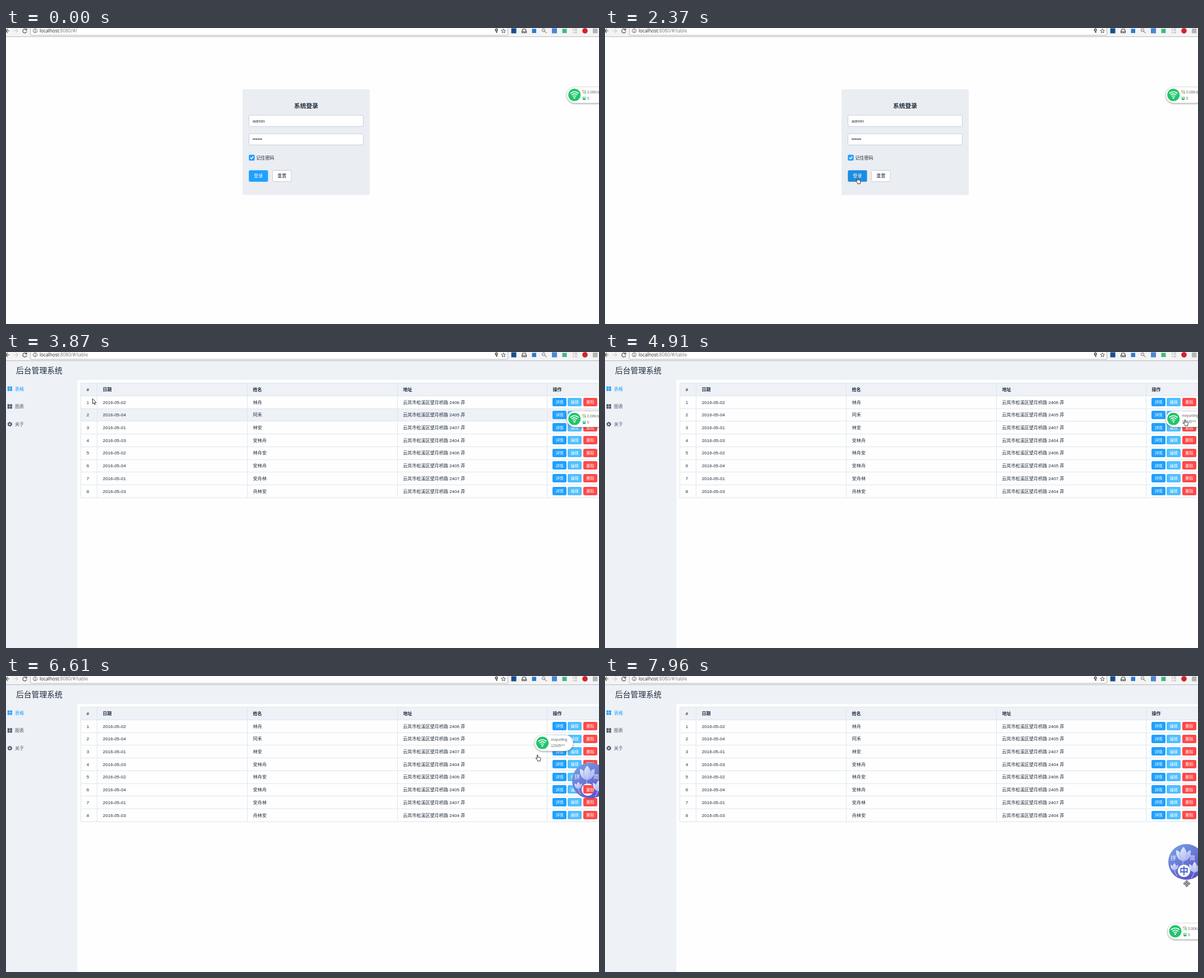
An HTML page that plays this animation: 1058 by 529 pixels, repeating every 8000 ms.

```html
<!DOCTYPE html>
<html lang="zh-CN">
<head>
<meta charset="utf-8">
<title>后台管理系统</title>
<style>
  html, body { margin: 0; width: 100%; height: 100%; overflow: hidden; background: #fefefe; }
  svg { display: block; width: 100%; height: 100%; }
  text { font: 8.05px "Liberation Sans", "Noto Sans CJK SC", "Noto Sans CJK", sans-serif; fill: #1f2d3d; white-space: pre; }
  .url { font: 8.25px "Open Sans", "Noto Sans", sans-serif; fill: #777; }
  .line { fill: none; stroke: #444; stroke-width: 1.1; }
  .white { fill: none; stroke: #fff; stroke-width: 1.6; }
  #widget .pill { filter: drop-shadow(0 1.5px 1.5px rgba(0, 0, 0, .4)); }
  #widget text { fill: #666; }
</style>
</head>
<body>
<svg id="stage" viewBox="0 0 1058 529" preserveAspectRatio="none"></svg>
<script>
const LOOP = 8000, STEP = 136, LAG = 130;
const LOGIN_END = 2520;
const ROWS = 8, ROW_TOP = 78, ROW_H = 22.7;
const $ = id => document.getElementById(id);

const rect = (x, y, w, h, fill, extra = '') =>
  `<rect x="${x}" y="${y}" width="${w}" height="${h}" fill="${fill}" ${extra}/>`;
const circle = (x, y, r, fill, extra = '') =>
  `<circle cx="${x}" cy="${y}" r="${r}" fill="${fill}" ${extra}/>`;
const path = (d, extra = 'class="line"') => `<path d="${d}" ${extra}/>`;
const group = (id, content) => `<g id="${id}">${content}</g>`;
const middle = 'text-anchor="middle"';
// cy is the middle of the line of text
const label = (x, cy, str, style = '', size = 8.05, extra = '') =>
  `<text x="${x}" y="${Math.round(cy + size * .37)}" style="font-size:${size}px;${style}" ${extra}>${str}</text>`;

function toolbar() {
  const list = [2, 5, 8.5].map(y => `M1011 ${y}H1013M1014.5 ${y}H1019`).join('');
  return rect(0, 0, 1058, 15, '#f4f4f4') + rect(0, 15, 1058, 1, '#b9b9b9') +
    rect(43.5, -6, 852, 19, '#fff', 'rx="1.5" stroke="#b5b5b5"') +
    path('M6 5H0M3 1.5L-.5 5L3 8.5') +
    path('M13 5H21M17.5 1.5L21 5L17.5 8.5', 'class="line" style="stroke:#ccc"') +
    path('M36.3 3A3.6 3.6 0 1 0 37 6M37 .8V3.8H34') +
    circle(52, 5, 3.6, 'none', 'stroke="#555" stroke-width=".9"') + path('M52 4.5V7.2M52 2.6V3.6') +
    `<text class="url" x="60" y="8"><tspan fill="#222">localhost</tspan>:8080/#/<tspan id="route">table</tspan></text>` +
    circle(875, 3.4, 1.8, 'none', 'stroke="#444" stroke-width="1.5"') + path('M875 5V9M875 7.5H877') +
    path('M887.5 1.4L888.6 4L891.3 4.2L889.2 6L889.9 8.7L887.5 7.2L885.1 8.7L885.8 6L883.7 4.2L886.4 4Z',
      'class="line" style="stroke-width:.9"') +
    path('M920.5 8.5V6L922 2H927L928.5 6V8.5ZM920.5 6H923L924 7H925.5L926.5 6H928.5') +
    circle(959, 4, 2.7, '#dde', 'stroke="#888"') + path('M961 6L964.5 9', 'class="line" style="stroke:#a85"') +
    path(list, 'class="line" style="stroke:#999"') +
    rect(901.5, .5, 9, 9, '#174f8c') + rect(938.5, 1.5, 7.5, 7.5, '#2b7cd0') +
    rect(974, .5, 9, 9, '#4a86d8') + rect(992.5, 1.5, 8, 7.5, '#41b883') +
    circle(1033, 5, 4.8, '#d5202a') + rect(1047, 1, 8.5, 8.5, '#b5b5b5');
}

function login() {
  const field = y => rect(433.5, y, 204, 20, '#fff', 'rx="2.3" stroke="#c5cfdc"');
  const dots = Array.from({ length: 6 }, (_, i) => circle(441.4 + i * 2.85, 198.6, 1.15, '#1f2d3d')).join('');
  return rect(422, 109.5, 227, 189, '#eaedf2', 'rx="3"') +
    label(535.5, 139, '系统登录', 'font-weight:bold', 10.75, middle) +
    field(156) + label(440, 166, 'admin') + field(189) + dots +
    rect(433.3, 226.5, 10.4, 10.4, '#20a0ff', 'rx="2"') + path('M436 231.6L438 233.7L441.4 229.7', 'class="white"') +
    label(446.3, 231.6, '记住密码') +
    rect(433.3, 254.2, 34.2, 20.6, '#20a0ff', 'rx="2.3" id="submit"') +
    label(450.4, 264.5, '登录', 'fill:#fff;font-weight:500', 8.05, middle) +
    rect(475.5, 254.5, 33.6, 20, '#fff', 'rx="2.3" stroke="#c9ccd2"') +
    label(492.3, 264.5, '重置', 'font-weight:500', 8.05, middle);
}

function sidebar() {
  const items = ['表格', '图表', '关于'].map((name, i) => {
    const y = 65.6 + i * 31.7, color = i ? '#48576a' : '#20a0ff';
    const ring = (r, w, dash) => circle(6.8, y, r, 'none', `stroke="${color}" stroke-width="${w}" stroke-dasharray="${dash}"`);
    const icon = i < 2
      ? rect(2.7, y - 4, 3.7, 8, color) + rect(7.2, y - 4, 3.7, 8, color) + rect(2.7, y - .3, 8.2, .5, '#eef1f6')
      : ring(2.6, 2, 'none') + ring(3.8, 1, '2 2');
    return icon + label(16, y, name, `fill:${color}`);
  });
  return rect(0, 16, 1058, 34, '#eef1f6') + rect(0, 50, 127.3, 479, '#eef1f6') +
    label(18, 33, '后台管理系统', '', 13.8) + items.join('');
}

function grid() {
  const names = ['林舟', '阿禾', '林安', '安林舟', '林舟安', '安林舟', '安舟林', '舟林安'];
  const days = ['02', '04', '01', '03'], doors = [2406, 2405, 2407, 2404];
  const actions = [['详情', '#20a0ff'], ['编辑', '#50bfff'], ['删除', '#ff4949']];
  const columns = [133, 162, 430, 698, 965];
  const crisp = 'shape-rendering="crispEdges"';

  let out = rect(133, 55, 925, 23, '#eef1f6') + rect(133, 0, 925, ROW_H, '#eef1f6', 'id="hover"');
  ['#', '日期', '姓名', '地址', '操作'].forEach((name, i) => {
    out += i ? label(columns[i] + 10.5, 66.8, name, 'font-weight:bold')
             : label(146, 66.8, name, 'font-weight:bold', 8.05, middle);
  });
  names.forEach((name, i) => {
    const y = ROW_TOP + (i + .5) * ROW_H + .3;
    out += label(146, y, i + 1, '', 8.05, middle) +
      label(172.8, y, '2016-05-' + days[i % 4]) + label(440.8, y, name) +
      label(708.3, y, `云岚市松溪区望月桥路 ${doors[i % 4]} 弄`);
    actions.forEach(([text, color], k) => {
      const x = Math.round(975 + k * 27.3);
      out += rect(x, Math.round(y - 7.8), 25, 15, color, 'rx="2.3"') +
        label(x + 12.5, y, text, 'fill:#fff;font-weight:500', 7, middle);
    });
  });
  for (let i = 0; i <= ROWS; i++) out += rect(133, Math.round(ROW_TOP + i * ROW_H), 925, 1, '#dfe6ec', crisp);
  out += rect(133, 55, 925, 1, '#dfe6ec', crisp);
  for (const x of columns) out += rect(x, 55, 1, 205, '#dfe6ec', crisp);
  return out;
}

function badge() {
  const lotus = (x, y, s) => `<g transform="translate(${x} ${y}) scale(${s})" fill="url(#petal)">` +
    path('M0 0C-9 -2 -14 -9 -13 -20Q-8 -19 -6 -15Q-4 -22 0 -26Q4 -22 6 -15Q8 -19 13 -20C14 -9 9 -2 0 0Z', '') +
    path('M0 0Q-8 -7 -6 -15M0 0Q8 -7 6 -15', 'fill="none" stroke="#8fa3ea" stroke-width=".8"') + '</g>';
  const glyph = 'fill:#f3f5ff;font-family:"Noto Serif","Noto Sans CJK SC",serif';
  // the round opening lets the page show through
  return path('M-32 0A32 32 0 1 1 32 0A32 32 0 1 1 -32 0ZM-15 16A11 11 0 1 0 7 16A11 11 0 1 0 -15 16Z',
      'fill="url(#sky)" fill-rule="evenodd"') +
    path('M-5 -3Q-7 2 -6 5M-21 14Q-20 21 -16 25M14 18Q13 24 9 29', 'fill="none" stroke="#c3cdfa"') +
    lotus(-5, -1, 1) + lotus(-21, 15, .5) + lotus(15, 19, .75) +
    label(-23, -7, '拼', glyph, 10, middle) + label(11, -7, '简', glyph, 10, middle) +
    group('mode', label(-4, 16, '中', 'fill:#4569c9;font-weight:bold', 16, middle));
}

function widget() {
  const small = (x, y, text) => label(x, y, text, '', 6.3);
  return rect(.5, .5, 68.5, 28.5, '#fff', 'rx="14.2" class="pill" stroke="#ddd" stroke-width=".6"') +
    circle(14.2, 14.6, 11, '#20c56b') + circle(14.2, 19.7, 1.5, '#fff') +
    path('M6.8 12A10.5 10.5 0 0 1 21.6 12M9 14.8A7.4 7.4 0 0 1 19.4 14.8M11.3 17.4A4.2 4.2 0 0 1 17.1 17.4', 'class="white"') +
    group('speed', path('M30 12.5V6M28.3 8L30 6', 'class="line" style="stroke:#f08a24"') +
      path('M33 6V12.5M34.5 10.5L33 12.5', 'class="line" style="stroke:#20b565"') +
      rect(29, 18, 5, 5.6, '#20b565', 'rx=".7"') + rect(30, 18.8, 3, 2, '#fff') +
      small(37, 9.2, '0.00K/s') + small(37, 20.5, '0')) +
    group('account', small(29.5, 9, 'moyunting') + small(29.5, 20, '12345***'));
}

const ink = 'fill="#fff" stroke="#222" stroke-width=".9" stroke-linejoin="round"';
const pointers = {
  arrow: path('M.5 .5V9.6L2.7 7.6L4.1 11L5.6 10.3L4.2 7.1H7Z', ink),
  hand: path('M3 7.5V1.6Q3.8 .1 4.6 1.6V5L6 5.2L7.4 5.6L8.7 6Q9.6 6.3 9.4 7.6L8.6 10.6V12H4V10.8L.7 7.4Q.6 6 2 6.6Z', ink),
  move: path('M6 0L8.2 2.6H6.8V5.2H9.4V3.8L12 6L9.4 8.2V6.8H6.8V9.4H8.2L6 12L3.8 9.4H5.2V6.8H2.6V8.2L0 6L2.6 3.8V5.2H5.2V2.6H3.8Z', ink)
};

const gradient = (id, from, to) =>
  `<linearGradient id="${id}" x2=".8" y2="1"><stop stop-color="${from}"/><stop offset="1" stop-color="${to}"/></linearGradient>`;
$('stage').innerHTML =
  `<defs>${gradient('sky', '#78a6e6', '#5a4cc4')}${gradient('petal', '#eef1ff', '#a9b5f2')}</defs>` +
  rect(0, 0, 1058, 529, '#fefefe') + group('login', login()) + group('table', sidebar() + grid()) +
  toolbar() + group('badge', badge()) + group('widget', widget()) +
  Object.entries(pointers).map(([id, shape]) => group(id, shape)).join('');

// key points: [time, x, y]
const pointerPath = [
  [430, 395, 402], [560, 466, 313], [860, 446, 267], [2950, 447, 266], [3480, 124, 170], [3870, 154, 83],
  [4500, 741, 92], [4650, 1027, 112], [4910, 1031, 120], [5220, 1042, 273], [5500, 1043, 281],
  [5760, 1028, 110], [6300, 1003, 119], [6610, 944.5, 140], [6880, 990, 430], [7285, 1035, 222],
  [7420, 1029.5, 197], [7690, 1031, 206], [7960, 1032, 365]];
const widgetPath = [[6300, 1000, 105], [6610, 942.8, 105], [6880, 983, 416], [7030, 1003.3, 441.6]];
const badgePath = [[7690, 1042, 187], [7960, 1037, 332.3]];

// Straight travel between key points, held for about STEP ms at a time
function along(keys, t) {
  const next = keys.findIndex(key => key[0] > t);
  if (next < 1) return (next ? keys[keys.length - 1] : keys[0]).slice(1);
  const [t0, x0, y0] = keys[next - 1], [t1, x1, y1] = keys[next];
  const steps = Math.max(1, Math.round((t1 - t0) / STEP));
  const p = Math.floor(steps * (t - t0) / (t1 - t0)) / steps;
  return [x0 + (x1 - x0) * p, y0 + (y1 - y0) * p];
}

const during = (t, from, to = LOOP) => t >= from && t < to;
const inside = ([x, y], left, top, w, h) => x >= left && x <= left + w && y >= top && y <= top + h;

function overFloating(t) {
  const [x, y] = along(pointerPath, t), [bx, by] = along(badgePath, t);
  return inside([x, y], ...along(widgetPath, t), 69, 29) ||
    during(t, 5910) && Math.hypot(x - bx, y - by) < 32;
}

// The row colour trails the pointer a little
function hoveredRow(t) {
  const past = t - LAG, spot = along(pointerPath, past);
  if (overFloating(past) || !inside(spot, 133, ROW_TOP, 925, ROWS * ROW_H)) return -1;
  return Math.floor((spot[1] - ROW_TOP) / ROW_H);
}

function pointerKind(t, spot) {
  if (during(t, 7690)) return 'move';
  const onSubmit = t < LOGIN_END && inside(spot, 433, 254, 34, 20);
  return onSubmit || overFloating(t) || during(t, 6300, 7030) ? 'hand' : 'arrow';
}

const show = (id, on) => { $(id).style.display = on ? '' : 'none'; };
const place = (id, [x, y]) => $(id).setAttribute('transform', `translate(${x} ${y})`);

function render(t) {
  show('login', t < LOGIN_END);
  show('table', t >= LOGIN_END);
  show('route', t >= 2370);
  $('submit').setAttribute('fill', t < 860 ? '#20a0ff' : t < 2250 ? '#4db3ff' : '#1d8ce0');

  const row = hoveredRow(t);
  show('hover', row >= 0);
  $('hover').setAttribute('y', ROW_TOP + row * ROW_H);

  const named = during(t, 4790, 7030);
  show('account', named);
  show('speed', !named);
  place('widget', along(widgetPath, t));

  show('badge', t >= 5910);
  show('mode', t >= 7690);
  place('badge', along(badgePath, t));

  const spot = along(pointerPath, t), kind = pointerKind(t, spot);
  for (const id in pointers) show(id, t >= 430 && id === kind);
  place(kind, spot);
}

const start = performance.now();
function tick() {
  render((performance.now() - start) % LOOP);
  requestAnimationFrame(tick);
}
tick();
</script>
</body>
</html>
```
